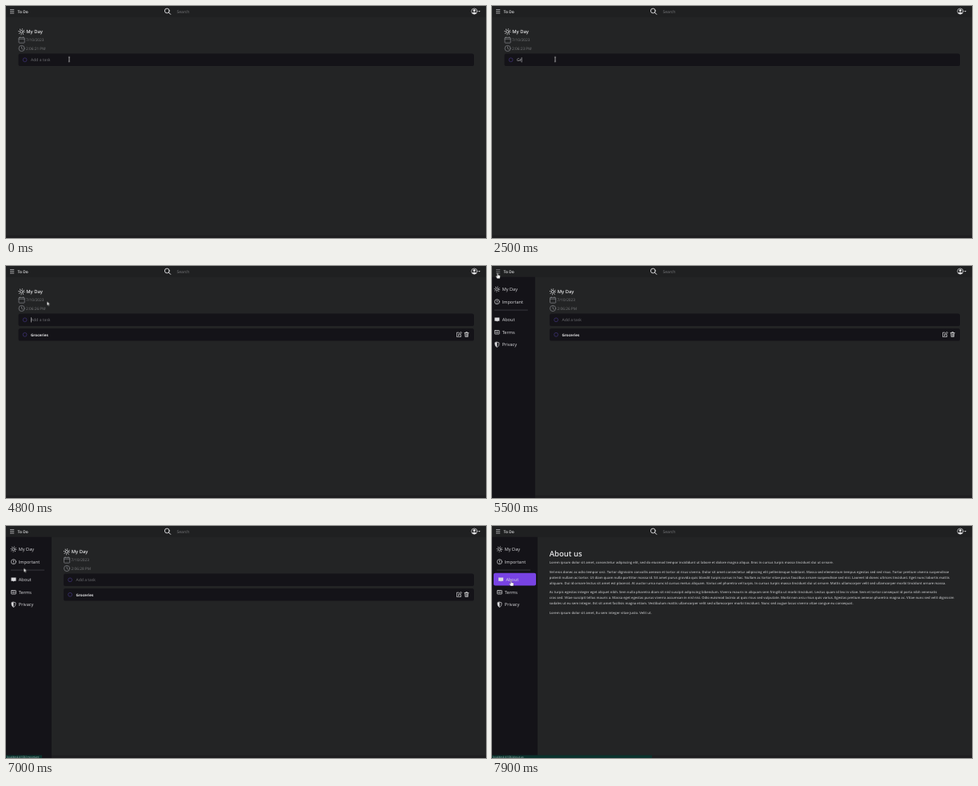
Animation of 600 by 290 pixels, one loop 8 s. Source, as an HTML page:

```html
<!DOCTYPE html>
<html lang="en">
<head>
<meta charset="utf-8">
<title>To Do</title>
<style>
@property --hover { syntax: "<number>"; inherits: true; initial-value: 0; }

html, body { margin: 0; width: 100%; height: 100%; overflow: hidden; background: #232425; }
svg { display: block; width: 100vw; height: 100vh; }
text {
  font-family: "Open Sans", "Noto Sans", sans-serif;
  text-rendering: geometricPrecision;
  white-space: pre;
}
.line { fill: none; stroke: currentColor; stroke-width: .7; stroke-linecap: round; stroke-linejoin: round; }
.solid { fill: currentColor; }
.muted { color: #85868a; fill: #77787b; }
.bright { color: #e4e4e6; fill: #e4e4e6; }
.row { fill: #141318; }
.nav text { font-size: 5.6px; fill: #d9d9dc; }
.nav { color: #d9d9dc; }
.copy { font-size: 4.2px; font-weight: 600; fill: #b4b5b7; }

.anim, .item { animation: 8s linear infinite; }
.hard { animation-timing-function: step-end; }

.shift { animation-name: shift; }
.row { animation-name: widen; }
.task { animation-name: appear; }
.side { animation-name: slide; }
.burger { animation-name: press; }
.tasks { animation-name: leave; }
.about { animation-name: enter; }
.status { animation-name: status; }
.pointer { animation-name: travel; }
.beam { animation-name: beam; }
.arrow { animation-name: arrow; }
.hand { animation-name: hand; }

.item rect.glow { fill: #7843e3; opacity: var(--hover); }
.item .label { transform: translateX(calc(var(--hover) * 1.6px)); }
.day { animation-name: hover-day; }
.important { animation-name: hover-important; }
.info { animation-name: hover-info; }

@keyframes shift { 0% { transform: none } 67%, 100% { transform: translateX(56.5px) } }
@keyframes widen { 0% { x: 15.5px; width: 569.5px } 67%, 100% { x: 72px; width: 513px } }
@keyframes appear { 0%, 44.5% { opacity: 0 } 45% { opacity: .08 } 50%, 100% { opacity: 1 } }
@keyframes slide {
  0%, 66.5% { transform: translateX(-58px) }
  67.5% { transform: translateX(-22px) }
  68.75% { transform: translateX(-3.2px) }
  70%, 100% { transform: none }
}
@keyframes press { 0% { opacity: 1 } 65.7% { opacity: .55 } 77.5%, 100% { opacity: 1 } }
@keyframes leave { 0% { opacity: 1 } 94.5%, 100% { opacity: 0 } }
@keyframes enter { 0% { opacity: 0 } 94.5%, 100% { opacity: 1 } }
@keyframes status { 0%, 79% { opacity: 0 } 80% { opacity: .45 } 81.5%, 100% { opacity: 1 } }
@keyframes hover-day { 0%, 78.3% { --hover: 0 } 79.8%, 84.3% { --hover: 1 } 85.8%, 100% { --hover: 0 } }
@keyframes hover-important { 0%, 84.5% { --hover: 0 } 85.5%, 86.2% { --hover: 1 } 87.2%, 100% { --hover: 0 } }
@keyframes hover-info { 0%, 89.4% { --hover: 0 } 91%, 100% { --hover: 1 } }
@keyframes travel {
  0%, 55.3% { transform: translate(79px, 66.6px); animation-timing-function: ease-in-out }
  66.2%, 77% { transform: translate(7px, 8.6px) }
  78.75% { transform: translate(14px, 20px) }
  80%, 84.3% { transform: translate(20.5px, 28px) }
  86.2% { transform: translate(23px, 43px) }
  87.4%, 89.3% { transform: translate(22.3px, 52.6px) }
  91.2% { transform: translate(24.2px, 66px) }
  92.5%, 98% { transform: translate(23.8px, 68px) }
  100% { transform: translate(23.8px, 68px) }
}
@keyframes beam { 0% { opacity: 1 } 57.5%, 100% { opacity: 0 } }
@keyframes arrow {
  0% { opacity: 0 } 57.5% { opacity: 1 } 65.7% { opacity: 0 } 77.5% { opacity: 1 }
  78.5% { opacity: 0 } 86.6% { opacity: 1 } 89.8%, 100% { opacity: 0 }
}
@keyframes hand {
  0% { opacity: 0 } 65.7% { opacity: 1 } 77.5% { opacity: 0 }
  78.5% { opacity: 1 } 86.6% { opacity: 0 } 89.8%, 100% { opacity: 1 }
}
</style>
</head>
<body>
<svg viewBox="0 0 600 290" preserveAspectRatio="none">
  <defs>
    <g id="sun">
      <circle class="line" r="1.6"/>
      <circle r="3.1" fill="none" stroke="currentColor" stroke-width="1.3" stroke-dasharray=".65 1.785"/>
    </g>
    <g id="ring"><circle r="2.4" fill="none" stroke="#3d3272" stroke-width=".8"/></g>
  </defs>

  <rect width="600" height="290" fill="#232425"/>
  <rect width="600" height="13.8" fill="#1f2021"/>
  <rect y="286.7" width="600" height="3.3" fill="#1e1e20"/>

  <g class="tasks anim hard">
    <g class="shift anim hard">
      <g class="bright">
        <use href="#sun" transform="translate(19.5 32.2) scale(1.08)"/>
        <text x="25.2" y="34.1" font-size="5.8" font-weight="600">My Day</text>
      </g>
      <g class="muted" font-size="4.75">
        <g class="line">
          <rect x="16" y="39.4" width="7.2" height="6.8" rx=".7"/>
          <path d="M16 41.2h7.2M17.8 38.8v.8M21.4 38.8v.8"/>
          <circle cx="19.6" cy="53" r="3.6"/>
          <path d="M19.6 50.8v2.4l1.4.9"/>
        </g>
        <text x="25" y="44.4">7/10/2023</text>
        <text x="25" y="54.6" id="time">2:06:21 PM</text>
      </g>
    </g>

    <rect class="row anim hard" x="15.5" y="59.4" width="569.5" height="15.6" rx="2.6"/>
    <g class="shift anim hard">
      <use href="#ring" x="23.6" y="67.3"/>
      <text id="field" x="31" y="69.1" font-size="5.05">Add a task</text>
      <rect id="caret" x="31" y="64.2" width=".6" height="6.2" fill="#d0d0d3"/>
    </g>

    <g class="task anim">
      <rect class="row anim hard" x="15.5" y="78" width="569.5" height="15.6" rx="2.6"/>
      <g class="shift anim hard">
        <use href="#ring" x="23.6" y="85.8"/>
        <text class="bright" x="31" y="87.6" font-size="4.6" font-weight="700">Groceries</text>
      </g>
      <g class="bright">
        <path class="line" d="M566 83.2h-2.6v5.4h5.2v-2.7M565.4 86.7l.4-1.5 2.8-2.8 1 1-2.8 2.8z"/>
        <path class="line" d="M573.2 83.6h5M574.9 83.5v-.9h1.6v.9M573.7 83.8l.4 4.8h3.2l.4-4.8M575.1 85v2.4M576.3 85v2.4"/>
      </g>
    </g>
  </g>

  <g class="about anim hard">
    <text class="bright" x="71.8" y="37.7" font-size="9.5" font-weight="600">About us</text>
    <g id="copy" class="copy"></g>
  </g>

  <g class="side anim nav">
    <rect y="13.8" width="57" height="276.2" fill="#141318"/>
    <path d="M6 55.1h42" stroke="#46464c" stroke-width=".7"/>
    <g class="item day">
      <rect class="glow" x="2" y="20.7" width="53" height="15.6" rx="2"/>
      <g class="label">
        <use href="#sun" x="9.5" y="29.1"/>
        <text x="15.8" y="31">My Day</text>
      </g>
    </g>
    <g class="item important">
      <rect class="glow" x="2" y="36.7" width="53" height="15.6" rx="2"/>
      <g class="label">
        <circle class="line" cx="9.5" cy="44.7" r="3"/>
        <path class="line" d="M9.5 43v1.9M9.5 46.3v.1"/>
        <text x="15.8" y="46.5">Important</text>
      </g>
    </g>
    <g class="item info">
      <rect class="glow" x="2" y="58.8" width="53" height="15.6" rx="2"/>
      <g class="label">
        <path class="solid" d="M6.5 64.5h6v4.2h-2.2l-.8.9-.8-.9h-2.2z"/>
        <text x="15.8" y="68.8">About</text>
      </g>
    </g>
    <g class="label">
      <rect class="line" x="6.6" y="80.5" width="5.8" height="4.6" rx=".6"/>
      <path class="line" stroke-dasharray=".5 1" d="M8 82h3.2M8 83.6h3.2"/>
      <text x="15.8" y="84.5">Terms</text>
      <path class="line" d="M9.5 95.1l2.5.8c.2 2.8-.5 4.6-2.5 5.6-2-1-2.7-2.8-2.5-5.6z"/>
      <path class="solid" d="M9.5 95.1v6.4c-2-1-2.7-2.8-2.5-5.6z"/>
      <text x="15.8" y="100.1">Privacy</text>
    </g>
  </g>

  <path class="burger anim hard" d="M5 4.6h5.2M5 6.8h5.2M5 9h5.2" stroke="#dcdcde" stroke-width=".7"/>
  <text class="bright" x="14.6" y="8.6" font-size="4.85" font-weight="600">To Do</text>
  <g class="bright">
    <circle class="line" cx="201.3" cy="6" r="2.9" style="stroke-width:.9"/>
    <path class="line" d="M203.5 8.2l2.2 2.2" style="stroke-width:1"/>
    <circle class="line" cx="585.4" cy="6.6" r="3.6"/>
    <circle class="solid" cx="585.4" cy="5.6" r="1.5"/>
    <path class="solid" d="M582.8 9c.6-1.7 4.6-1.7 5.2 0-1.1 1.5-4.1 1.5-5.2 0z"/>
    <path class="solid" d="M590.3 6h2.6l-1.3 1.5z"/>
  </g>
  <text class="muted" x="213.5" y="8.7" font-size="5.05">Search</text>

  <g class="status anim">
    <rect id="bubble" y="286.5" width="45" height="3.5" fill="#0a322d"/>
    <text id="link" x="1" y="290.2" font-size="3.4" fill="#a9bcb8"></text>
  </g>

  <g class="pointer anim">
    <path class="beam anim hard" d="M-1.1-2.8h.8l.3.3.3-.3h.8M0-2.5v5M-1.1 2.8h.8l.3-.3.3.3h.8"
      fill="none" stroke="#e6e6e6" stroke-width=".65"/>
    <path class="arrow anim hard" d="M0 0v5l1.2-1.1.8 1.8.8-.4-.8-1.7h1.6z" fill="#fff" stroke="#111" stroke-width=".3"/>
    <path class="hand anim hard" d="M-.6.6q.6-1 1.2 0v2.1l2.2.6q.6.2.5.9l-.5 2.7h-3.3l-1.9-2.7q.4-.9 1.8.2z"
      fill="#fff" stroke="#111" stroke-width=".3"/>
  </g>
</svg>

<script>
const LOOP = 8000;
const LEAD = 40;
const TASK = "Groceries";
const KEYS = [2200, 2500, 2600, 2700, 2900, 3000, 3100, 3300, 3400];
const ENTER = 3600;
const CARET = [[600, 1100], [1600, 4000], [4500, 5000]];
const HOST = "localdesk:4100/";

const COPY = [
  [46.6, "Lorem ipsum dolor sit amet, consectetur adipiscing elit, sed do eiusmod tempor incididunt ut labore et dolore magna aliqua. Eros in cursus turpis massa tincidunt dui ut ornare."],
  [59, "Vel eros donec ac odio tempor orci. Tortor dignissim convallis aenean et tortor at risus viverra. Dolor sit amet consectetur adipiscing elit pellentesque habitant. Massa sed elementum tempus egestas sed sed risus. Tortor pretium viverra suspendisse"],
  [65.8, "potenti nullam ac tortor. Ut diam quam nulla porttitor massa id. Sit amet purus gravida quis blandit turpis cursus in hac. Nullam ac tortor vitae purus faucibus ornare suspendisse sed nisi. Laoreet id donec ultrices tincidunt. Eget nunc lobortis mattis"],
  [72.5, "aliquam. Dui id ornare lectus sit amet est placerat. At auctor urna nunc id cursus metus aliquam. Varius vel pharetra vel turpis. In cursus turpis massa tincidunt dui ut ornare. Mattis ullamcorper velit sed ullamcorper morbi tincidunt ornare massa."],
  [84.4, "Ac turpis egestas integer eget aliquet nibh. Sem nulla pharetra diam sit nisl suscipit adipiscing bibendum. Viverra mauris in aliquam sem fringilla ut morbi tincidunt. Lectus quam id leo in vitae. Sem et tortor consequat id porta nibh venenatis"],
  [91.1, "cras sed. Vitae suscipit tellus mauris a. Massa eget egestas purus viverra accumsan in nisl nisi. Odio euismod lacinia at quis risus sed vulputate. Morbi non arcu risus quis varius. Egestas pretium aenean pharetra magna ac. Vitae nunc sed velit dignissim"],
  [97.8, "sodales ut eu sem integer. Est sit amet facilisis magna etiam. Vestibulum mattis ullamcorper velit sed ullamcorper morbi tincidunt. Nunc sed augue lacus viverra vitae congue eu consequat."],
  [109.7, "Lorem ipsum dolor sit amet, Eu sem integer vitae justo. Velit ut."]
];

const el = id => document.getElementById(id);
const time = el("time"), field = el("field"), caret = el("caret");
const bubble = el("bubble"), link = el("link");

for (const [y, line] of COPY) {
  const text = document.createElementNS("http://www.w3.org/2000/svg", "text");
  text.setAttribute("x", 71.8);
  text.setAttribute("y", y);
  text.textContent = line;
  el("copy").append(text);
}

function setText(node, value) {
  if (node.textContent !== value) node.textContent = value;
}

function render(t) {
  setText(time, `2:06:${21 + Math.floor((t + 400) / 1000)} PM`);

  const typed = t < ENTER ? KEYS.filter(k => k <= t).length : 0;
  setText(field, typed ? TASK.slice(0, typed) : "Add a task");
  field.setAttribute("fill", typed ? "#d4d4d7" : "#6f7074");
  caret.setAttribute("x", 31 + (typed ? field.getComputedTextLength() : 0));
  caret.setAttribute("opacity", CARET.some(([a, b]) => t >= a && t < b) ? 1 : 0);

  const page = t < 6800 ? "my-day" : t < 7200 ? "important" : "about-us";
  setText(link, HOST + page);
  bubble.setAttribute("width", t < 6800 ? 40 : t < 7600 ? 45 : 200);
}

let start;
function frame(now) {
  start ??= now;
  render((now - start + LEAD) % LOOP);
  requestAnimationFrame(frame);
}
render(0);
requestAnimationFrame(frame);
</script>
</body>
</html>
```
